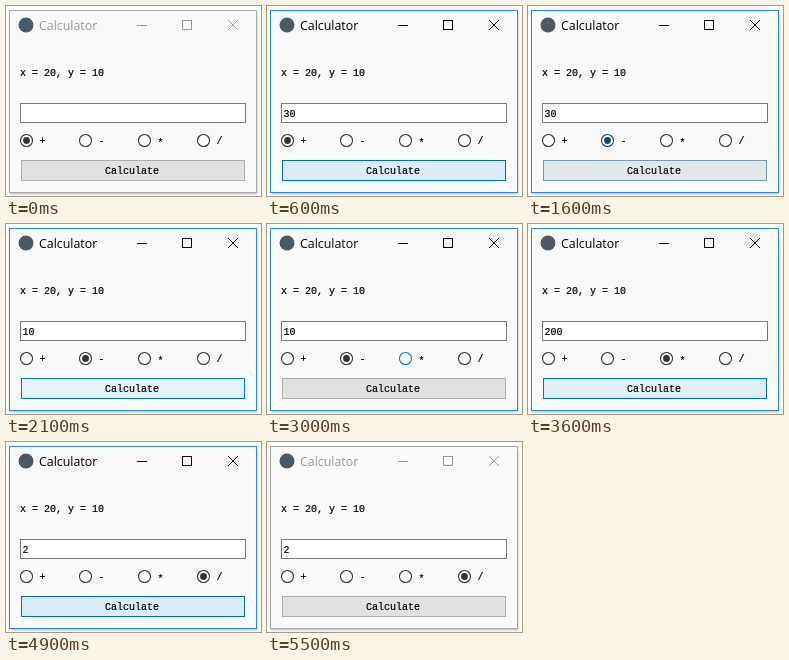
An HTML page that plays this animation: 255 px wide and 190 px high, repeating every 5.6 s.

```html
<!DOCTYPE html>
<html lang="en">
<head>
<meta charset="utf-8">
<title>Calculator</title>
<style>
  html, body { margin: 0; width: 100%; height: 100%; overflow: hidden; background: #fff; }
  svg { display: block; width: 255px; height: 190px; }
  text { font: 10px "Liberation Mono", monospace; fill: #000; stroke: #000; stroke-width: .2px; white-space: pre; }
  #title { font: 12.4px "Open Sans", sans-serif; stroke: none; }
  .line { fill: none; stroke-width: 1; }
</style>
</head>
<body>
<svg viewBox="0 0 255 190">
  <defs>
    <filter id="soft" x="-5%" y="-5%" width="110%" height="110%"><feGaussianBlur stdDeviation="1.6"/></filter>
  </defs>
  <rect width="255" height="190" fill="#fff"/>
  <rect x="4" y="7" width="247" height="181" fill="#000" opacity=".3" filter="url(#soft)"/>
  <rect id="frame" x="3.5" y="4.5" width="247" height="182" fill="#f9f9f9"/>
  <circle cx="20" cy="19" r="7.5" fill="#4a5966"/>
  <text id="title" x="33" y="24">Calculator</text>
  <g id="controls" class="line">
    <path d="M131 19.5h10M176.5 14.5h9v9h-9z" shape-rendering="crispEdges"/>
    <path d="M222 14l10 10M232 14l-10 10"/>
  </g>
  <text x="14" y="70">x = 20, y = 10</text>
  <rect x="14.5" y="97.5" width="225" height="19" fill="#fff" stroke="#7a7a7a"/>
  <text id="result" x="16.5" y="111"></text>
  <g id="radios"></g>
  <rect id="button" x="15.5" y="154.5" width="223" height="20"/>
  <text x="99" y="168">Calculate</text>
</svg>
<script>
const LOOP = 5600;
const $ = id => document.getElementById(id);

// Each step holds until the next one and keeps whatever it does not mention.
// hot / press: button glow; over: radio under the pointer; glow / down: its tint
const changes = [
  [0,    { active: 0, value: '', sel: 0, hot: 0, press: 0, over: -1, glow: 0, down: 0 }],
  [200,  { active: 1, hot: .5 }],
  [300,  { hot: 1 }],
  [400,  { press: .6 }],
  [500,  { press: 1, value: '30' }],
  [600,  { press: .4 }],
  [800,  { press: 0 }],
  [1000, { hot: .5 }],
  [1100, { hot: 0, over: 1, glow: .5 }],
  [1200, { glow: 1 }],
  [1400, { down: 1 }],
  [1500, { sel: 1, down: .5 }],
  [1600, { down: 0, glow: .6, hot: .35 }],
  [1700, { glow: .3, hot: .7 }],
  [1800, { glow: 0, hot: 1 }],
  [1900, { press: .5 }],
  [2000, { press: 1, value: '10' }],
  [2100, { press: 0 }],
  [2600, { hot: .6 }],
  [2700, { hot: .2 }],
  [2800, { hot: 0 }],
  [2900, { over: 2, glow: .5 }],
  [3000, { glow: 1 }],
  [3100, { down: 1 }],
  [3200, { sel: 2, down: 0, glow: .6 }],
  [3300, { glow: 0, hot: .6 }],
  [3400, { hot: 1, press: .6 }],
  [3500, { press: 1, value: '200' }],
  [3600, { press: .2 }],
  [3700, { press: .12 }],
  [3800, { press: .06 }],
  [3900, { press: 0 }],
  [4100, { hot: .6 }],
  [4200, { hot: 0, over: 3, glow: .6 }],
  [4300, { glow: 1, down: 1 }],
  [4400, { sel: 3, down: 0, hot: .2 }],
  [4500, { glow: .45, hot: .6 }],
  [4600, { glow: 0, hot: 1 }],
  [4700, { press: .6 }],
  [4800, { press: 1, value: '2' }],
  [4900, { press: .4 }],
  [5100, { press: .15 }],
  [5200, { press: 0 }],
  [5500, { active: 0, hot: 0 }]
];
let last = {};
const steps = changes.map(([time, change]) => ({ time, state: last = { ...last, ...change } }));

const mix = (a, b, k) => `rgb(${a.map((v, i) => Math.round(v + (b[i] - v) * k))})`;
const tint = (plain, hot, press, s) =>
  s.press ? mix(hot, press, s.press) : mix(plain, hot, s.hot);

function make(tag, attrs, parent) {
  const el = document.createElementNS('http://www.w3.org/2000/svg', tag);
  set(el, attrs);
  return parent.appendChild(el);
}
function set(el, attrs) {
  for (const key in attrs) el.setAttribute(key, attrs[key]);
}

const radios = ['+', '-', '*', '/'].map((sign, i) => {
  const x = 20.5 + 59 * i, group = $('radios');
  const ring = make('circle', { cx: x, cy: 134.5, r: 6, 'stroke-width': 1.1 }, group);
  const dot = make('circle', { cx: x, cy: 134.5, r: 3.4 }, group);
  make('text', { x: x + 13, y: sign === '*' ? 140 : 138 }, group).textContent = sign;
  return { ring, dot };
});

const INK = [51, 51, 51], BLUE = [0, 120, 215], NAVY = [0, 84, 153];

function draw(s) {
  set($('frame'), { stroke: s.active ? '#2a8ad4' : '#a5a5a5' });
  $('title').style.fill = s.active ? '#000' : '#999';
  set($('controls'), { stroke: s.active ? '#000' : '#999' });
  $('result').textContent = s.value;
  set($('button'), {
    fill: tint([225, 225, 225], [229, 241, 251], [204, 228, 247], s),
    stroke: tint([173, 173, 173], BLUE, NAVY, s)
  });
  radios.forEach(({ ring, dot }, i) => {
    const near = i === s.over, glow = near ? s.glow : 0, down = near ? s.down : 0;
    const picked = i === s.sel;
    set(ring, {
      stroke: down ? mix(BLUE, NAVY, down) : mix(INK, picked ? NAVY : BLUE, glow),
      fill: mix([255, 255, 255], [204, 228, 247], down)
    });
    set(dot, { fill: mix(INK, NAVY, glow), visibility: picked ? 'visible' : 'hidden' });
  });
}

const start = performance.now();
let shown;
function tick(now) {
  const t = Math.max(0, now - start) % LOOP;
  const step = steps.findLast(({ time }) => time <= t);
  if (step !== shown) draw((shown = step).state);
  requestAnimationFrame(tick);
}
tick(start);
</script>
</body>
</html>
```
